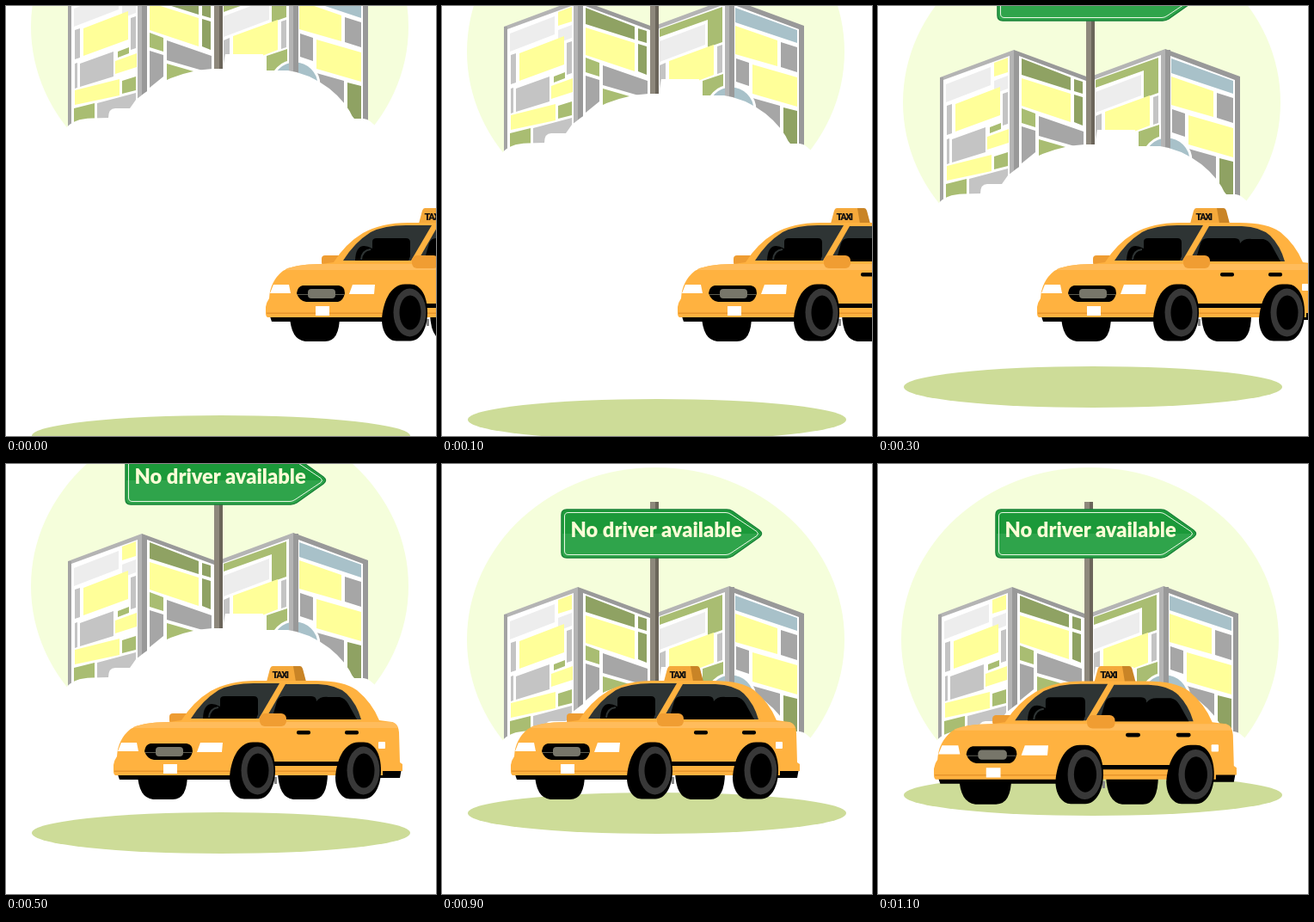
Write an HTML page that moves like this. It is 500 px wide and 500 px high and loops after 2100 ms.

```html
<!DOCTYPE html>
<html lang="en">
<head>
<meta charset="utf-8">
<title>No driver available</title>
<style>
  html, body { margin: 0; width: 100%; height: 100%; overflow: hidden; background: #fff; }

  svg {
    display: block;
    width: 100%;
    height: 100%;
    animation: pose 2100ms step-end infinite;
  }

  /* Every part holds its pose between the steps. */
  @keyframes pose {
    0%       { --car: 177px; --grow: 1, 1; --ground: 500px; --map-x: 0px; --map-y: -180px; }
    4.7619%  { --car: 149px; --grow: 1, 1; --ground: 481px; --map-x: 0px; --map-y: -151px; }
    9.5238%  { --car: 120px; --grow: 1, 1; --ground: 463px; --map-x: 0px; --map-y: -122px; }
    14.2857% { --car: 60px;  --grow: 1, 1; --ground: 443px; --map-x: 0px; --map-y: -92px; }
    23.8095% { --car: 0px;   --grow: 1, 1; --ground: 429px; --map-x: 0px; --map-y: -62px; }
    33.3333% { --car: -28px; --grow: 1, 1; --ground: 420px; --map-x: 0px; --map-y: -14px; }
    42.8571% { --car: -45px; --grow: 1, 1; --ground: 406px; --map-x: 0px; --map-y: 0px; }
    52.381%, 100% { --car: -60px; --grow: 1.0475, 1.0365; --ground: 385px; --map-x: -2px; --map-y: 0px; }
  }

  #scene  { transform: translate(var(--map-x), var(--map-y)); }
  #ground { transform: translateY(var(--ground)); }
  #car    { transform: translateX(var(--car)) scale(var(--grow)); transform-origin: 125px 235px; }

  .label { font: 900 23.7px Lato, sans-serif; fill: #fbfcd6; }
  .taxi  { font: 900 11px Roboto, sans-serif; letter-spacing: -1.5px; fill: #111; }
</style>
</head>
<body>
<svg viewBox="0 0 500 500">
  <defs>
    <g id="wheel">
      <path d="M-4-33C-22-33-30-10-31 8-31 22-24 33-14 33H2C14 33 22 18 22 0 22-20 14-33 2-33Z"/>
      <ellipse cx="1.500" rx="19" ry="28" fill="#383838"/>
      <ellipse cx="2" rx="12.500" ry="20"/>
    </g>
  </defs>

  <g id="scene">
    <ellipse cx="248.5" cy="204" rx="219.5" ry="200" fill="#f5fedb"/>

    <!-- folded map: frames, paper, blocks -->
    <path fill="#b4b4b4" d="M72 175 158 143V325H72ZM250 173 334 142V325H250Z"/>
    <path fill="#999" d="M158 143 245 175V325H158ZM334 142 421 174V325H334Z"/>
    <path fill="#a3a3a3" d="M72 175h4v150h-4Z"/>
    <path fill="#fff" d="M76 178 153 150V325H76ZM164 150 242 179V325H164ZM250 178 329 149V325H250ZM340 150 415 178V325H340Z"/>
    <path fill="#ededed" d="M79 183 131 163V184L79 204ZM135 179 151 173V188L135 194ZM253 192 306 172V196L253 216Z"/>
    <path fill="#c4c4c4" d="M145 194 151 192V229L145 231ZM80 208 86 206V240L80 242ZM86 247 125 233V262L86 274ZM80 247 83 246V275L80 276ZM106 293 151 281V320H106ZM253 220 260 217V254H253ZM320 198 326 196V228L320 230Z"/>
    <path fill="#a6a6a6" d="M187 220 239 238V258L187 243ZM167 232 183 237V262L167 275ZM394 193 413 199V228L394 222ZM342 212 357 217V244L342 239ZM361 258 393 267V300L361 280Z"/>
    <path fill="#a9bd72" d="M130 233 143 228V235L130 240ZM135 267 151 262V278L135 282ZM79 299 103 293V325H79ZM167 211 183 217V233L167 228ZM187 247 239 262V275H187ZM253 178 326 152V193L309 199V167L253 187ZM303 238 327 230V260H303Z"/>
    <path fill="#8fa263" d="M167 153 224 175V190L167 172ZM228 177 238 180V194L228 191ZM228 195 238 198V231L228 227ZM397 269 413 273V320L397 302Z"/>
    <path fill="#a8c1c9" d="M341 153 413 179V194L341 170Z"/>
    <path fill="#ff9" d="M135 158 151 152V169L135 174ZM90 206 142 186V219L90 238ZM127 244 152 235V251L127 259ZM80 278 132 265V284L80 295ZM167 176 224 194V227L167 208ZM264 215 316 196V231L264 251ZM341 174 390 191V221L341 207ZM361 219 413 234V268L361 253Z"/>
    <circle cx="336" cy="272" r="28" fill="#a8c1c9" stroke="#fff" stroke-width="3"/>
    <path fill="#b4b4b4" d="M329 145h5v120h-5Z"/>
    <path fill="#999" d="M334 143h6v125h-6Z"/>

    <!-- signpost -->
    <path fill="#8e887c" d="M242 44h10v220h-10Z"/>
    <path fill="#6b655a" d="M248 44h4v220h-4Z"/>
    <path fill="#2fa44b" stroke="#178337" stroke-width="1.500" d="M145 53H331Q335 53 338 55L369 77Q374 81 369 85L338 107Q335 109 331 109H145Q139 109 139 103V59Q139 53 145 53Z"/>
    <path fill="#1b9939" d="M145 54H331Q335 54 338 56L368 78Q370 79.500 370 81H140V59Q140 54 145 54Z"/>
    <path fill="none" stroke="#e9f7e4" d="M147 56.500H330Q333 56.500 336 58.500L366 78.500Q369 81 366 83.500L336 103.500Q333 105.500 330 105.500H147Q142.500 105.500 142.500 101V61Q142.500 56.500 147 56.500Z"/>
    <text class="label" x="149.500" y="85">No driver available</text>

    <!-- white cut-out in front of the map -->
    <path fill="#fff" d="M70 322Q78 311 100 310.500L119 310Q119 299 127 299H144L151 289Q190 256 240 253H252L255 236H299L301 255H328Q352 258 376 276 396 292 404 311H416Q424 312 431 322V420H70Z"/>
  </g>

  <ellipse id="ground" cx="250" rx="220" ry="24" fill="#cddc98"/>

  <g id="car">
    <!-- far wheels and underbody -->
    <path d="M153 360H211Q211 390 194 390H171Q154 388 153 360ZM316 358H374Q374 390 357 390H334Q317 388 316 358Z"/>
    <path d="M129 358H270V367H132ZM432 354H460L458 365H432Z"/>
    <path fill="#888" d="M312 364h3v8h-3Z"/>

    <!-- roof light -->
    <path fill="#f5a93b" d="M310 235H335L338 253H303L307 238Q308 235 310 235Z"/>
    <path fill="#c98426" d="M334 235H342Q344 235 345 238L349 253H337Z"/>
    <text class="taxi" x="309.500" y="248.500">TAXI</text>

    <!-- body -->
    <rect x="190" y="290" width="24" height="12" rx="4" fill="#ee9c32"/>
    <path fill="#ffb240" d="M125 350Q126 344 129 340 130 320 145 308 158 300 190 300L204 298Q218 276 238 264 260 252 290 252H360Q393 252 408 263 426 278 434 298L449 300Q456 302 457 312L458 347 461 349V357H438V362H127Q125 361 125 357Z"/>
    <path fill="#ffbc5c" d="M148 306Q163 300 192 300H449Q455 302 456 307H148Z"/>

    <!-- windows -->
    <path fill="#2e3434" d="M215 296Q228 275 247 263 263 255 288 255H318L294 296Z"/>
    <path d="M229 296Q230 272 249 282V274Q249 270 254 270H288Q293 270 293 275V291L291 296H229Z"/>
    <path fill="none" stroke="#2e3434" stroke-width="2" d="M236 295Q237 284 247 283"/>
    <path fill="#2e3434" d="M302 296 325 256H363Q385 257 396 267 408 279 413 297H302Z"/>
    <path d="M315 276Q317 270 323 270H355Q361 270 361 276 365 270 375 271H388Q394 272 398 279L408 297H309Z"/>

    <!-- doors and trim -->
    <rect x="295" y="290" width="31" height="15" rx="6" fill="#f09d32"/>
    <rect x="338" y="310" width="16" height="4.500" rx="2"/>
    <rect x="394" y="310" width="16" height="4.500" rx="2"/>
    <path d="M308 346H390V351H308Z"/>
    <path fill="#e8962c" d="M126 356.500H265V358H126ZM308 356.500H390V358H308Z"/>
    <rect x="433" y="323" width="8" height="8" rx="1" fill="#fff"/>

    <!-- front -->
    <path fill="#fff" d="M134 324H152L154 334H130ZM226 324H252L251 335H222ZM183 349H199V360H183Z"/>
    <path d="M168 325H210Q217 326 217 334 215 343 209 344H172Q164 343 161 334 162 326 168 325Z"/>
    <path stroke="#5a5a50" d="M162 335.500H216"/>
    <rect x="174" y="329" width="32" height="11" rx="4" fill="#77766a"/>

    <!-- near wheels -->
    <use href="#wheel" x="291" y="356.500"/>
    <use href="#wheel" x="414" y="356.500"/>
  </g>
</svg>
</body>
</html>
```
